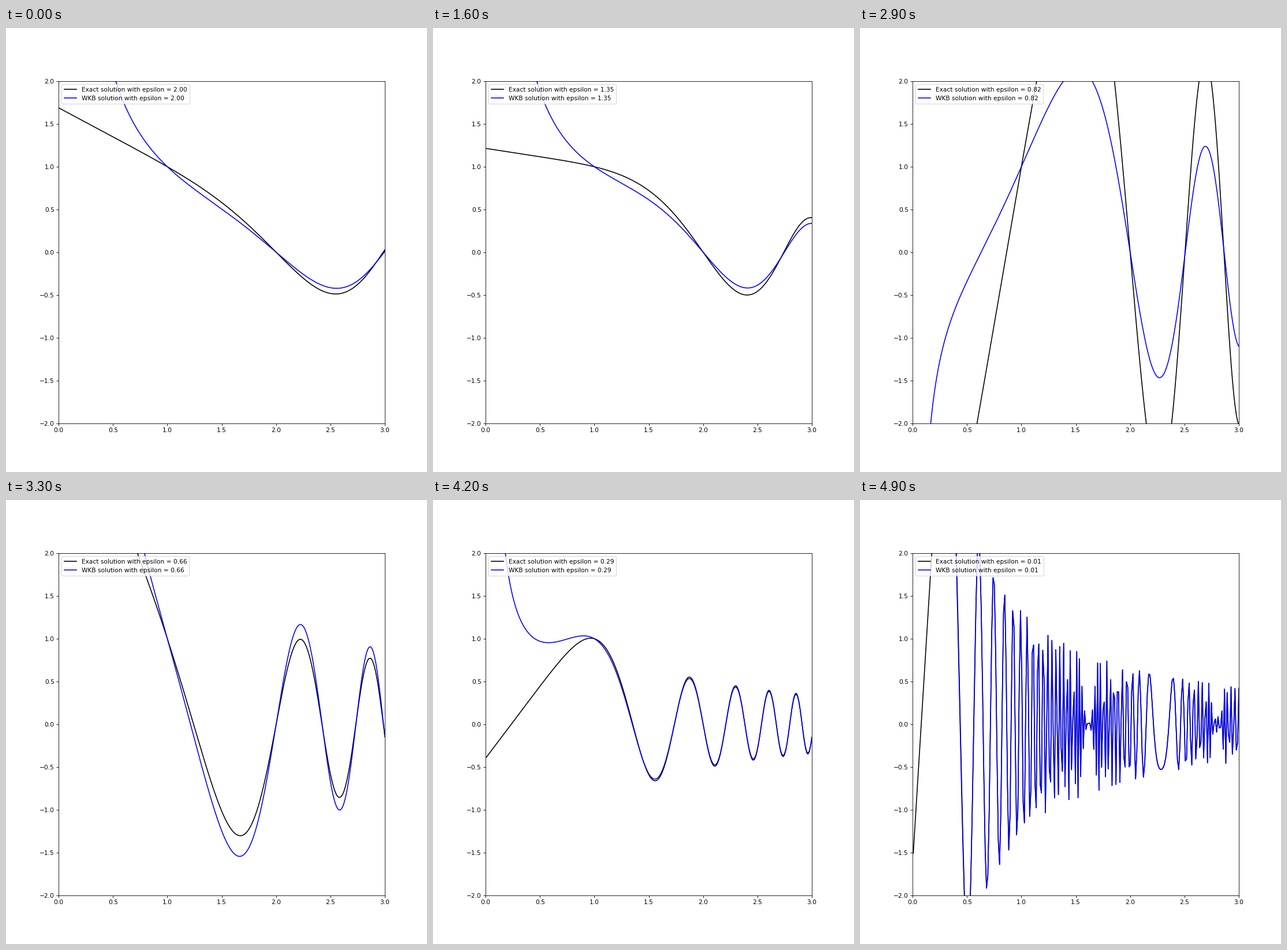
Write a matplotlib script that moves like this. It is 729 px wide and 768 px high and loops after 5000 ms.

```python
import math

import matplotlib.pyplot as plt
import numpy as np
from matplotlib.animation import FuncAnimation

WIDTH, HEIGHT, DPI = 729, 768, 76.8
FRAMES = 50
INTERVAL = 100
EPSILONS = np.linspace(2, 0.01, FRAMES)
X = np.linspace(0.006, 3, 250)


def bessel_j(nu, z):
    """Bessel function J: power series for small z, Hankel expansion for large z."""
    near = np.minimum(z, 12.0)
    series = sum((-1) ** k * (near / 2) ** (2 * k + nu)
                 / (math.factorial(k) * math.gamma(k + nu + 1))
                 for k in range(45))

    far = np.maximum(z, 12.0)
    term = np.ones_like(far, dtype=complex)
    total = term.copy()
    for k in range(1, 11):
        term = term * 1j * (4 * nu**2 - (2 * k - 1) ** 2) / (8 * k * far)
        total += term
    phase = far - nu * np.pi / 2 - np.pi / 4
    hankel = np.sqrt(2 / (np.pi * far)) * (np.exp(1j * phase) * total).real
    return np.where(z < 12, series, hankel)


def exact(x, eps):
    """Solution of eps^2 y'' + x^4 y = 0 with y(1) = 1 and y(2) = 0."""
    def basis(nu, t):
        t = np.asarray(t, dtype=float)
        return np.sqrt(t) * bessel_j(nu, t**3 / (3 * eps))

    def combine(t):
        return (basis(1 / 6, t) * basis(-1 / 6, 2)
                - basis(-1 / 6, t) * basis(1 / 6, 2))

    return combine(x) / combine(1)


def wkb(x, eps):
    return np.sin((8 - x**3) / (3 * eps)) / (x * np.sin(7 / (3 * eps)))


plt.rcParams["font.family"] = "DejaVu Sans"
fig, ax = plt.subplots(figsize=(WIDTH / DPI, HEIGHT / DPI), dpi=DPI)
ax.set_xlim(0, 3)
ax.set_ylim(-2, 2)
ax.set_xticks(np.arange(0, 3.1, 0.5))
ax.set_yticks(np.arange(-2, 2.1, 0.5))

curves = [("Exact", exact, "black"), ("WKB", wkb, "blue")]
lines = [ax.plot([], [], color=color, label=f"{name} solution with epsilon = 2.00")[0]
         for name, _, color in curves]
legend = ax.legend(loc="upper left")


def update(frame):
    eps = EPSILONS[frame]
    for (name, solve, _), line, text in zip(curves, lines, legend.get_texts()):
        line.set_data(X, solve(X, eps))
        text.set_text(f"{name} solution with epsilon = {eps:.2f}")
    return lines


anim = FuncAnimation(fig, update, frames=FRAMES, interval=INTERVAL,
                     repeat=True, repeat_delay=0, blit=False)
plt.show()
```
